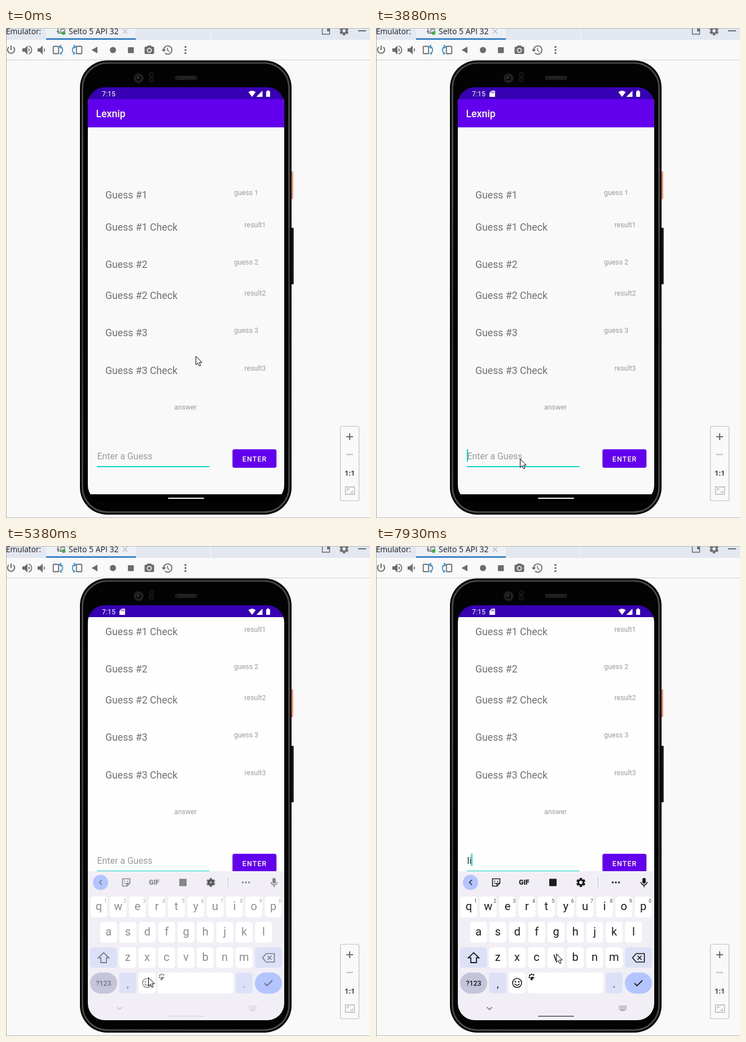
Animation of 645 by 868 pixels, one loop 8 s. Source, as an HTML page with a canvas:

```html
<!DOCTYPE html>
<html lang="en">
<head>
<meta charset="utf-8">
<title>Emulator</title>
<style>
  html, body { margin: 0; width: 100%; height: 100%; overflow: hidden; background: #f9f9f9; }
  canvas { display: block; }
</style>
</head>
<body>
<canvas id="stage" width="645" height="868"></canvas>
<script>
const g = document.getElementById('stage').getContext('2d');
const LOOP = 8000;
const ROBOTO = 'Roboto, sans-serif';
const SANS = '"Open Sans", sans-serif';
const HINT = '#9b9b9b', INK = '#1c1c20', GREY = '#6c6c6c', TEAL = '#0ad6c4', BLUE = '#3b92d0';

// Pointer stops: time, x, y
const POINTER = [
  [0, 336, 581], [120, 339, 576], [270, 339, 574], [2060, 339, 575],
  [2180, 336, 589], [2300, 302, 640], [2420, 276, 697], [2570, 265, 744],
  [2710, 263, 757], [2830, 260, 764], [2950, 258, 765], [3760, 258, 764],
  [3880, 255, 763], [4030, 253, 763], [5110, 252, 763], [5230, 252, 764],
  [5530, 254, 763], [5650, 268, 755], [5770, 300, 740], [5920, 350, 715],
  [6040, 410, 691], [6160, 443, 680], [6310, 449, 678], [6890, 440, 666],
  [7010, 424, 653], [7160, 412, 645], [7300, 404, 640], [7540, 400, 643],
  [7660, 381, 660], [7780, 351, 688], [7930, 319, 722]
];
// The caret flips at each of these times, starting hidden
const CARET = [440, 1090, 2710, 3370, 3610, 4030, 4680, 5110, 5650, 6160, 6590, 7160, 7420];
const within = (t, a, b) => t >= a && t < b;

function box(x, y, w, h, r, fill, stroke, lw = 1) {
  g.beginPath();
  g.roundRect(x, y, w, h, r);
  if (fill) { g.fillStyle = fill; g.fill(); }
  if (stroke) { g.strokeStyle = stroke; g.lineWidth = lw; g.stroke(); }
}

function dot(x, y, r, fill, stroke, lw = 1) {
  box(x - r, y - r, 2 * r, 2 * r, r, fill, stroke, lw);
}

// Fills an SVG path at x, y, or strokes it when lw is given
function shape(d, x, y, color, lw) {
  const p = new Path2D(d);
  g.save();
  g.translate(x, y);
  if (lw) {
    g.strokeStyle = color;
    g.lineWidth = lw;
    g.stroke(p);
  } else {
    g.fillStyle = color;
    g.fill(p);
  }
  g.restore();
}

function text(s, x, y, size, color, { weight = 400, font = ROBOTO, align = 'left', gap = 0 } = {}) {
  g.font = `${weight} ${size}px ${font}`;
  g.textAlign = align;
  g.letterSpacing = gap + 'px';
  g.fillStyle = color;
  g.fillText(s, x, y);
}

function gear(x, y, r, color, hole) {
  g.save();
  g.translate(x, y);
  g.fillStyle = color;
  for (let i = 0; i < 6; i++) {
    g.rotate(Math.PI / 3);
    g.fillRect(-r * 0.28, -r, r * 0.56, r);
  }
  g.restore();
  dot(x, y, r * 0.74, color);
  dot(x, y, r * 0.36, hole);
}

function speaker(x, waves) {
  shape('M-8-3v6h4l5 5V-8l-5 5z', x, 39, GREY);
  shape('M3-3.5a4 4 0 0 1 0 7z', x, 39, GREY);
  if (waves) shape('M3-7a7.2 7.2 0 0 1 0 14', x, 39, GREY, 1.7);
}

function rotateIcon(x, flip) {
  g.save();
  g.translate(x, 39);
  g.scale(flip, 1);
  box(-8.3, -6.5, 9.5, 13, 1, null, GREY, 1.8);
  shape('M3-6c7 1 7 10 1 12M6-9L2.5-6L6-3M8 3L4 6L7 8', 0, 0, BLUE, 1.8);
  g.restore();
}

function drawIde() {
  box(0, 0, 645, 868, 0, '#f9f9f9');
  box(0, 0, 645, 21, 0, '#e2e7f0');
  box(71, 0, 159, 21, 0, '#edf0f5');
  box(71, 18, 159, 3, 0, '#3f85c8');
  box(362, 0, 1, 21, 0, '#f8f9fb');
  text('Emulator:', 0, 11, 13.7, '#1d1d1d', { font: SANS });
  shape('M-5-8v13h6M-7 2h5', 97, 4, GREY, 1.5);
  box(97, 2, 7, 7, 1, null, GREY, 1.3);
  dot(102, 9, 3.2, '#36b33f');
  text('Selto 5 API 32', 111, 11, 14, '#1d1d1d', { font: SANS });
  shape('M-4-4L4 4M4-4L-4 4', 211, 6, '#b2b5ba', 1.1);
  box(560.5, -2, 13, 13, 0, null, GREY, 1.5);
  box(569, -1, 5, 7, 0, GREY);
  gear(599, 5, 8, GREY, '#e2e7f0');
  box(624, 4, 14, 2, 0, GREY);

  shape('M-4.2-5.2a6.3 6.3 0 1 0 8.4 0M0-8V0', 9, 39, GREY, 2);
  speaker(37, true);
  speaker(64, false);
  rotateIcon(92, 1);
  rotateIcon(126, -1);
  shape('M-5.5 0L5-6V6z', 157, 39, GREY);
  dot(189.5, 39, 5.5, GREY);
  box(216, 34, 10.5, 10.5, 1, GREY);
  box(245.5, 33, 17, 13, 2, GREY);
  shape('M-5 1l2-3h6l2 3z', 254, 33, GREY);
  dot(254, 39.5, 4.3, '#f9f9f9');
  dot(254, 39.5, 2.7, GREY);
  shape('M-7 0a7.4 7.4 0 1 1 2.3 5.4', 286.3, 39, GREY, 1.9);
  shape('M-10.5-1h7.6l-3.8 4.4z', 286.3, 39, GREY);
  shape('M0-4V.5L3.5 3', 286.3, 39, GREY, 1.5);
  for (const y of [33.5, 39, 44.5]) dot(318, y, 1.8, GREY);
  box(0, 56, 645, 1, 0, '#cfcfcf');
  box(0, 0, 645, 1, 0, '#b5b8bd');
  box(0, 0, 1, 868, 0, '#a9a9a9');
  box(0, 867, 645, 1, 0, '#b9b9b9');

  box(592.5, 705.5, 33, 132, 3, '#f9f9f9', '#c2c2c2', 1.2);
  shape('M-6 0H6M0-6V6', 609, 724, GREY, 2);
  shape('M-6 0H6', 609, 755.5, '#b7b7b7', 1.8);
  text('1:1', 609, 793, 13, '#565656', { weight: 700, font: SANS, align: 'center' });
  box(601.5, 813, 16, 13, 0, null, '#b4b4b4', 1.3);
  shape('M-4.5 0V-3H-1M4.5 0V3H1', 609.5, 819.5, '#b4b4b4', 1.3);
}

function drawPhone() {
  box(505, 254, 3.7, 49, 1, '#ff8660');
  box(505, 354, 4.7, 100, 1, '#141414');
  box(131, 57.5, 375, 804.5, 48, '#060606');
  const rim = g.createLinearGradient(0, 57, 0, 862);
  rim.addColorStop(0, '#484848');
  rim.addColorStop(0.25, '#5a5a5a');
  rim.addColorStop(0.6, '#363636');
  rim.addColorStop(1, '#505050');
  box(135.5, 62, 366, 795.5, 44, '#030303', rim, 2.6);
  dot(235, 89, 9, '#1c1c1e');
  dot(235, 89, 5.2, '#08080a', '#333338', 1);
  dot(234, 88, 2, '#39414d');
  for (const y of [83, 92]) box(254, y - 4, 7, 8, 3, '#0b0b0b', '#242424', 1);
  box(300, 85.5, 38, 5.5, 2.7, '#171717', '#343434', 1);
  for (let x = 307; x < 332; x += 3) box(x, 87, 1, 2, 0, '#444');
}

function drawStatus(t) {
  box(145, 105, 348, 21, 0, '#3700b3');
  text('7:15', 170, 121, 12.4, '#fff');
  if (t >= 3490) {
    shape('M4-5.5H9Q10-5.5 10-4.5V4.5Q10 5.5 9 5.5H1Q0 5.5 0 4.5V-1.5z', 201, 116.5, '#fff');
    shape('M4-4v3M6-4v3M8-4v3', 201, 116.5, '#3700b3', 0.9);
  }
  shape('M-6.5-3Q0-8 6.5-3L0 5.5z', 436, 116.5, '#fff');
  shape('M-5.5 5.5h11v-11z', 449, 116.5, '#fff');
  box(461, 112, 7, 10, 1, '#fff');
  box(463, 110.5, 3, 2, 0, '#fff');
}

function drawApp(t) {
  const up = t < 5230 ? 0 : t < 5380 ? 198 : 201;
  const typed = t < 6590 ? '' : t < 7420 ? 'l' : 'li';
  g.save();
  g.beginPath();
  g.rect(145, 126, 348, 714);
  g.clip();
  g.translate(0, -up);
  box(145, 126, 348, 700, 0, up ? '#fefefe' : '#f9f9f9');
  box(145, 126, 348, 50, 0, '#6200ee');
  text('Lexnip', 159.5, 158, 17.7, '#fff', { weight: 500 });

  const rows = [[301.5, 358.5], [424.5, 479.5], [545.5, 612.5]];
  rows.forEach(([guess, check], i) => {
    const n = i + 1;
    text(`Guess #${n}`, 176, guess, 17.7, '#717171');
    text(`guess ${n}`, 404, guess - 5.5, 12.4, HINT);
    text(`Guess #${n} Check`, 176, check, 17.7, '#717171');
    text(`result${n}`, 422.5, check - 5.5, 12.4, HINT);
  });
  text('answer', 298, 675.7, 12.4, HINT);

  text(typed || 'Enter a Guess', 161.5, 764, 15.95, typed ? '#222' : HINT);
  const flips = CARET.filter(c => c <= t).length;
  if (flips % 2) {
    const w = typed ? g.measureText(typed).width : 0;
    box(161 + w, 746, 2, 22, 0, TEAL);
  }
  box(161, 776, 199.5, 2, 0, TEAL);
  box(401.3, 746.3, 78, 32.7, 3.5, '#6200ee');
  text('ENTER', 418.8, 767.7, 12.4, '#fff', { weight: 500, gap: 1.15 });
  g.restore();
}

const KEY_ROWS = [['qwertyuiop', 164.4, 621], ['asdfghjkl', 181.6, 666], ['zxcvbnm', 215.7, 711]];
const PITCH = 34.35;

function drawToolbar() {
  const y = 596;
  shape('M2.5-4.5L-2 0L2.5 4.5', 167.5, y, INK, 1.5);
  shape('M-6.5-6.5h13v8l-5 5h-8zM6.5 1.5h-5v5', 213, y, INK, 1.6);
  dot(210.5, y - 2, 1, INK);
  dot(215.5, y - 2, 1, INK);
  shape('M-3 1Q0 4 3 1', 212.5, y, INK, 1.2);
  text('GIF', 262.5, y + 4.3, 12, INK, { weight: 900, align: 'center' });
  box(307, y - 6.5, 13, 13, 1, INK);
  gear(363, y, 8, INK, '#f1eff5');
  for (const x of [419.5, 425, 430.5]) dot(x, y, 1.7, INK);
  box(472, y - 8, 6, 10, 3, INK);
  shape('M-5.5-1a5.5 5.5 0 0 0 11 0M0 4.5V8.5', 475, y, INK, 1.6);
}

function drawLabels() {
  drawToolbar();
  for (const [letters, x0, y] of KEY_ROWS) {
    [...letters].forEach((c, i) => {
      const x = x0 + i * PITCH;
      text(c, x, y + 24, 20, INK, { align: 'center' });
      if (y === 621) text((i + 1) % 10, x + 12, y + 10.5, 8.5, '#45454c', { align: 'center' });
    });
  }
  shape('M0-9L9.5 0H5V8.5H-5V0H-9.5z', 173, 729.5, INK, 1.8);
  shape('M-10.5 0L-4-7.5H10.5V7.5H-4zM-1.5-3.5l7 7M5.5-3.5l-7 7', 465, 729.5, INK, 1.7);
  text('?123', 173, 779, 12.4, INK, { weight: 500, align: 'center' });
  text(',', 215.7, 782, 18, INK, { align: 'center' });
  text('.', 422, 782, 18, INK, { align: 'center' });
  dot(250, 774, 8, null, INK, 1.6);
  dot(247, 772, 1.4, INK);
  dot(253, 772, 1.4, INK);
  shape('M-4.5 1.5Q0 7 4.5 1.5', 250, 774, INK, 1.6);
  shape('M-2.5 3Q-3-1.5 1-2Q4.5-2 4.5 .5Q1 1 1.5 3.5Q-.5 5.5-2.5 3z', 276, 765, INK);
  for (const [x, y] of [[271.8, 764], [272.5, 760.5], [275.5, 758.8], [279, 759.5]]) dot(x, y, 1.5, INK);
  shape('M-7 0l4.5 4.5L7-5', 465, 774.5, INK, 1.8);
}

// Enlarged letter above a pressed key
function drawPopup(c, x, keyTop) {
  g.save();
  g.shadowColor = 'rgba(0,0,0,.25)';
  g.shadowBlur = 6;
  g.shadowOffsetY = 1;
  box(x - 22, keyTop - 46, 44, 46, 7, '#fff');
  g.restore();
  text(c, x, keyTop - 14, 27, INK, { align: 'center' });
}

function drawKeyboard(t) {
  box(145, 576, 348, 265, 0, '#f1eff5');
  dot(167.5, 596, 13.5, '#b3c4ff');
  box(393, 587, 1, 18, 0, '#c8c7cf');
  for (const [letters, x0, y] of KEY_ROWS) {
    for (let i = 0; i < letters.length; i++) box(x0 + i * PITCH - 15, y, 30, 36.5, 5, '#fff');
  }
  const soft = '#dde1f7';
  box(149, 711, 48, 36, 5, soft);
  box(441, 711, 48, 36, 5, soft);
  box(149, 755.5, 48, 37.5, 18.7, '#c4c5db');
  box(200.5, 755.5, 30.5, 37, 5, soft);
  box(235, 755.5, 30, 37, 5, '#fff');
  box(268.5, 755.5, 134.5, 37, 5, '#fff');
  box(407, 755.5, 30, 37, 5, soft);
  box(441, 755.5, 48, 37.5, 18.7, '#b3c4ff');

  g.globalAlpha = t < 5530 ? 0.5 : 1;
  drawLabels();
  g.globalAlpha = 1;

  const icon = t < 6590 ? '#c5c4ca' : t < 6740 ? '#9b9aa0' : '#77767c';
  shape('M-4.5-2.2L0 2.3L4.5-2.2', 201, 819, icon, 1.6);
  for (let r = 0; r < 3; r++) {
    for (let c = 0; c < 6; c++) box(430.5 + c * 2.4, 814.5 + r * 2.6, 1.4, 1.5, 0, icon);
  }
  box(433, 822, 8, 1.2, 0, icon);
  const pill = t < 5920 ? '#dedde2' : t < 6590 ? '#aeadb2' : '#727176';
  box(287, 832, 64, 2, 1, pill);

  if (within(t, 6590, 6740)) drawPopup('l', 456.4, 666);
  if (within(t, 7420, 7540)) drawPopup('i', 404.8, 621);
}

function drawPointer(t) {
  const [, x, y] = POINTER.findLast(p => p[0] <= t);
  const arrow = 'M.5.5V15.5L4 12.3L6.6 17.8L9 16.7L6.5 11.3H11.2z';
  shape(arrow, x, y, '#fff');
  shape(arrow, x, y, '#000', 1);
}

function draw(t) {
  drawIde();
  drawPhone();
  g.save();
  g.beginPath();
  g.roundRect(145, 105, 348, 735, 30);
  g.clip();
  box(145, 105, 348, 735, 0, '#000');
  drawApp(t);
  drawStatus(t);
  if (t >= 5380) drawKeyboard(t);
  else box(287, 832, 64, 2, 1, '#f2f2f2');
  g.restore();
  drawPointer(t);
}

function tick() {
  draw(performance.now() % LOOP);
  requestAnimationFrame(tick);
}
tick();
</script>
</body>
</html>
```
